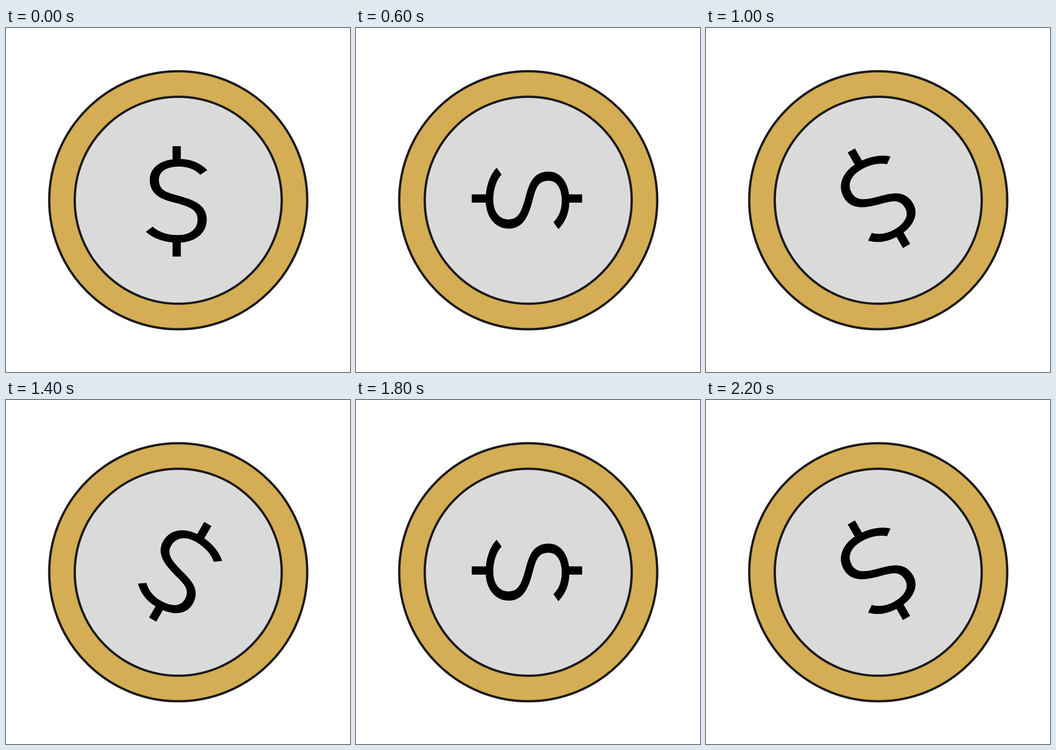
An HTML page that plays this animation: 748 px wide and 748 px high, repeating every 2.4 s.

```html
<!DOCTYPE html>
<html lang="en">
<head>
<meta charset="utf-8">
<title>Spinning coin</title>
<style>
  html, body { margin: 0; width: 100%; height: 100%; overflow: hidden; background: #fff; }
  svg { display: block; width: 100vw; height: 100vh; }
</style>
</head>
<body>
<svg viewBox="0 0 748 748">
  <g stroke="#1b1b1b" stroke-width="5">
    <circle cx="374.5" cy="374.5" r="280.5" fill="#d4ad54"/>
    <circle cx="374.5" cy="374.5" r="225" fill="#dadada"/>
  </g>
  <g id="sign" fill="none" stroke="#000">
    <g transform="translate(371.1 377)">
      <path stroke-width="18" d="M0-120V-86M0 83V120"/>
      <path transform="scale(1.2 1)" stroke-width="16.5"
        d="M49.2-63C37.5-77 21.7-84 4.2-84C-22.5-84-40.5-70-40.5-47C-40.5-18-21.7-11 2.5-4C26.7 4 46.2 13 46.2 39C46.2 65 29 81.5 1.7 81.5C-18 81.5-38 74-49.6 60.5"/>
    </g>
  </g>
</svg>
<script>
  const STEP = 200;
  // The sign is slightly off-centre, so opposite angles differ in place.
  const ANGLES = [0, 30, 60, 90, 120, 150, 180, 210, 60, 90, 120, 150];
  const sign = document.getElementById('sign');

  function draw() {
    const pose = Math.floor(performance.now() / STEP) % ANGLES.length;
    sign.setAttribute('transform', `rotate(${ANGLES[pose]} 374.5 374.2)`);
    requestAnimationFrame(draw);
  }
  draw();
</script>
</body>
</html>
```
